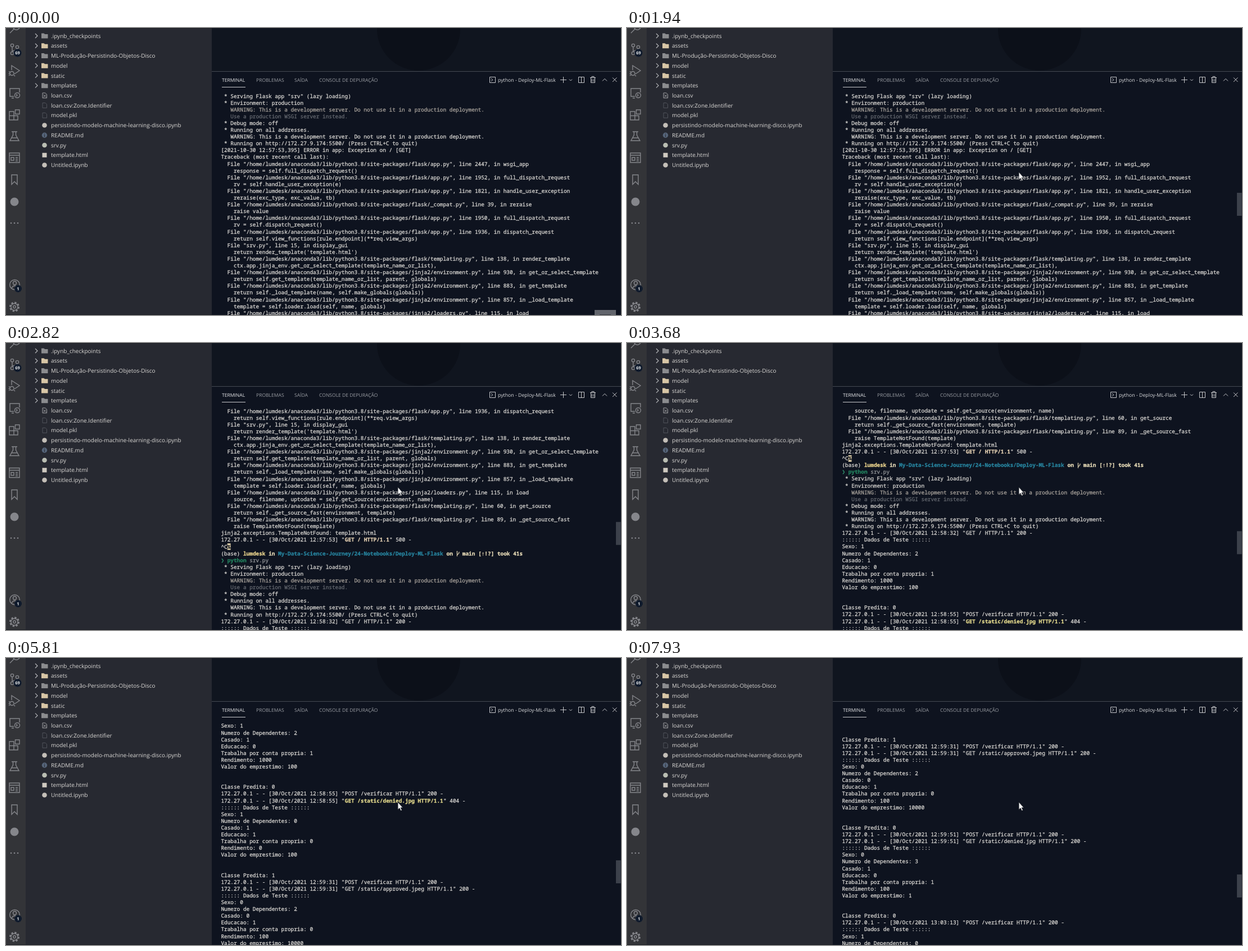
Write an HTML page that moves like this. It is 1094x512 px and loops after 8000 ms.

```html
<!DOCTYPE html>
<html lang="pt">
<head>
<meta charset="utf-8">
<title>Terminal</title>
<style>
  html, body { margin: 0; width: 100%; height: 100%; overflow: hidden; background: #0e131f; }
  svg { display: block; position: absolute; left: 0; top: 0; }
  text { white-space: pre; text-rendering: geometricPrecision; }
  .ui { font-family: "Open Sans", "Noto Sans", sans-serif; }
  .term { font: 500 9.42px "Noto Sans Mono", "DejaVu Sans Mono", monospace; font-variant-ligatures: none; color: #dad8d4; }
  .term text { fill: currentColor; stroke: currentColor; stroke-width: .28; }
  .icon { fill: none; stroke: #85868b; stroke-width: 1.4; }
  .tool { fill: none; stroke: #c6c7ca; stroke-width: 1; }
  .b { font-weight: 700; }
  .warn { color: #aaa49d; }
  .dim { color: #656970; }
  .user, .path, .pale, .cmd, .e500, .e404, .inv { font-weight: 700; }
  .user { color: #ecd58e; }
  .path { color: #27849f; }
  .pale { color: #e8dcb8; }
  .arrow { color: #2f8b6a; }
  .cmd { color: #23835f; }
  .prog { color: #96999c; }
  .e500 { color: #e6d2b4; }
  .e404 { color: #e2d88c; }
  .inv { color: #1a1c22; }
</style>
</head>
<body>
<svg id="stage" width="1094" height="512" viewBox="0 0 1094 512">
  <defs>
    <clipPath id="view"><rect x="367" y="115" width="727" height="397"/></clipPath>
    <clipPath id="top"><rect x="366" width="728" height="77"/></clipPath>
  </defs>
  <rect width="1094" height="512" fill="#0e131f"/>
  <rect x="366" width="728" height="77" fill="#10151f"/>
  <circle cx="734" cy="2" r="74" fill="#0c1019" clip-path="url(#top)"/>
  <path d="M366 77.5H1094" stroke="#454952"/>
  <rect width="35" height="512" fill="#333438"/>
  <rect x="35" width="331" height="512" fill="#272931"/>
  <rect x="35" width="331" height="1" fill="#1b1d24"/>
  <rect y="511" width="366" height="1" fill="#1b1d24"/>

  <g class="icon">
    <path d="M7 9L14 2M13 0Q15 4 20 3Q23 2 24 0"/>
    <circle cx="11" cy="31" r="2.6"/><circle cx="11" cy="45" r="2.6"/><circle cx="20" cy="34" r="2.6"/>
    <path d="M11 34V42M20 37Q19 40 11 41"/>
    <path d="M10 75V67L24 76L15 82"/><circle cx="10.5" cy="81" r="3.5"/><path d="M5 78L8 79M5 85L8 83M4.5 81.5H7M14 84L16 86"/>
    <path d="M14 122H7V108H24V115M10 125H14"/><circle cx="20" cy="120" r="4.5"/><path d="M18 118L20 120L18 122"/>
    <path d="M6 149H14V164H6ZM6 156.500H21V164H14M16.500 146H24V153.500H16.500Z"/>
    <path d="M10 185H20M12.500 185V191L7 201H23L17.500 191V185M10 196H20"/>
    <path d="M6 223H24V240H6ZM6 227H24M9 231H14V236H9ZM17 231H21M17 234H21M17 237H21"/>
    <path d="M10 262H20V279L15 274L10 279Z"/>
    <circle cx="15.5" cy="458" r="8.8"/><circle cx="15.5" cy="455" r="3"/><path d="M10 465Q11 460 15.500 460Q20 460 21 465"/>
    <circle cx="15" cy="497.5" r="7.5" stroke-width="3" stroke-dasharray="3.3 2.59"/><circle cx="15" cy="497.5" r="6"/><circle cx="15" cy="497.5" r="2.3"/>
  </g>
  <circle cx="15" cy="310" r="7.5" fill="#85868b"/>
  <g fill="#85868b"><circle cx="9" cy="348" r="1.3"/><circle cx="15" cy="348" r="1.3"/><circle cx="21" cy="348" r="1.3"/></g>
  <g fill="#0f1a2c"><circle cx="20.5" cy="44.5" r="7"/><circle cx="21.5" cy="465" r="6.5"/></g>
  <g class="ui b" fill="#e3e5e8" font-size="7.5" text-anchor="middle"><text x="20.5" y="47.3">69</text><text x="21.5" y="467.8">1</text></g>

  <g id="files" class="ui" font-size="10"></g>

  <g class="ui" font-size="8.55" fill="#9a9da3">
    <text x="384" y="95.7" fill="#e8e9eb">TERMINAL</text>
    <text x="445" y="95.7">PROBLEMAS</text>
    <text x="513" y="95.7">SAÍDA</text>
    <text x="557" y="95.7">CONSOLE DE DEPURAÇÃO</text>
    <text x="875" y="95.7" font-size="8.75" fill="#d8d9db">python - Deploy-ML-Flask</text>
  </g>
  <path d="M384 105.500H426" stroke="#c9cacd"/>
  <g class="tool">
    <path d="M860.500 87.500H870.500V97.500H860.500ZM863 90L866 92.500L863 95"/>
    <path d="M986 92.500H997M991.500 87V98M1002 91.500L1004.500 94L1007 91.500"/>
    <path d="M1018.500 87.500H1028.500V97.500H1018.500ZM1023.500 87.500V97.500"/>
    <path d="M1039 88.500H1049M1042 88V86.500H1046V88M1040.500 89V97.500H1047.500V89M1042.500 91V96M1045.500 91V96"/>
    <path d="M1061 94.500L1065 90.500L1069 94.500M1079 88.500L1086.500 96M1086.500 88.500L1079 96"/>
  </g>

  <g clip-path="url(#view)"><g id="log" class="term"></g></g>
  <path id="link" stroke="#d0cfcc" stroke-width="1"/>
  <rect id="thumb" x="1085" y="294" width="8.5" height="41" fill="#3c414b"/>
  <g id="tip"><rect x="1047" y="503" width="38" height="9" fill="#62656c"/><path d="M1056 511.500H1076" stroke="#33363d"/></g>
  <path id="mouse" d="M0 0V13.500L3 10.800L5.200 15.600L7.400 14.600L5.200 10H9Z" fill="#f4f4f4" stroke="#14171f" stroke-width=".8"/>
</svg>
<script>
const NS = "http://www.w3.org/2000/svg";
const $ = id => document.getElementById(id);
const LOOP = 8000, X0 = 382.4, BASE = 124.5, ROW = 12.1, COL = 5.651;

function add(parent, tag, attrs, text) {
  const el = document.createElementNS(NS, tag);
  for (const k in attrs) el.setAttribute(k, attrs[k]);
  if (text !== undefined) el.textContent = text;
  parent.appendChild(el);
  return el;
}

// Explorer: name, icon kind, icon colour
const GREY = "#8b8c8f", SAND = "#d8c6a6";
const files = [
  [".ipynb_checkpoints", "dir", GREY], ["assets", "dir", SAND],
  ["ML-Produção-Persistindo-Objetos-Disco", "dir", GREY], ["model", "dir", SAND],
  ["static", "dir", SAND], ["templates", "dir", GREY],
  ["loan.csv", "sheet", "#a2a3a6"], ["loan.csv:Zone.Identifier", "page", "#51545c"],
  ["model.pkl", "page", "#51545c"],
  ["persistindo-modelo-machine-learning-disco.ipynb", "dot", "#c4bfb8"],
  ["README.md", "info", "#56657a"], ["srv.py", "dot", "#b9bdb2"],
  ["template.html", "box", "#cfc9c0"], ["Untitled.ipynb", "dot", "#c4bfb8"]
];

function fileIcon(g, kind, c) {
  const line = { fill: "none", stroke: c };
  if (kind === "dir") {
    add(g, "path", { d: "M52 -4L56 0L52 4", fill: "none", stroke: "#b4b5b8", "stroke-width": 1.2 });
    add(g, "path", { d: "M63 -4.500H67.500L69 -3H74.500V4.500H63Z", fill: c });
  } else if (kind === "dot") {
    add(g, "circle", { cx: 68.5, cy: 0, r: 4.3, fill: c });
  } else if (kind === "box") {
    add(g, "rect", { x: 64.5, y: -4, width: 8, height: 8, fill: c });
  } else if (kind === "info") {
    add(g, "circle", { cx: 68.5, cy: 0, r: 4.7, fill: c });
    add(g, "path", { d: "M68.500 -2.700V-1.500M68.500 -.5V3", stroke: "#272931", "stroke-width": 1.2 });
  } else {
    add(g, "path", { d: "M65 -4.500H70L72.500 -2V4.500H65Z", ...line });
    if (kind === "sheet") add(g, "path", { d: "M66.500 -1.500L71 3M71 -1.500L66.500 3", ...line });
  }
}

files.forEach(([name, kind, c], i) => {
  const g = add($("files"), "g", { transform: `translate(0 ${14 + i * 17.73})` });
  fileIcon(g, kind, c);
  add(g, "text", { x: 80, y: 3.6, fill: "#dad8d5" }, name);
});

// Terminal log: a line is a string or a list of [text, class]
const USER = "lumdesk";
const lib = (file, line, fn, code) => [
  `  File "/home/${USER}/anaconda3/lib/python3.8/site-packages/${file}.py", line ${line}, in ${fn}`,
  "    " + code
];
const app = (line, fn, code) => lib("flask/app", line, fn, code);
const env = (line, fn, code) => lib("jinja2/environment", line, fn, code);
const tpl = (line, fn, code) => lib("flask/templating", line, fn, code);
const DEV = "WARNING: This is a development server. Do not use it in a production deployment.";
const banner = [
  ' * Serving Flask app "srv" (lazy loading)',
  " * Environment: production",
  [["   " + DEV, "warn"]],
  [["   Use a production WSGI server instead.", "dim"]],
  " * Debug mode: off",
  " * Running on all addresses.",
  "   " + DEV,
  " * Running on http://172.27.9.174:5500/ (Press CTRL+C to quit)"
];
const hit = (time, req, code, cls = "") => [
  [`172.27.0.1 - - [30/Oct/2021 ${time}] "`, ""], [req + " HTTP/1.1", cls], [`" ${code} -`, ""]
];
const LABELS = ["Sexo", "Numero de Dependentes", "Casado", "Educacao",
  "Trabalha por conta propria", "Rendimento", "Valor do emprestimo"];
const test = (...v) => [":::::: Dados de Teste ::::::", ...v.map((n, i) => `${LABELS[i]}: ${n}`)];
const result = (cls, time) => ["", "", "Classe Predita: " + cls, hit(time, "POST /verificar", 200)];

const lines = [
  ...banner,
  "[2021-10-30 12:57:53,395] ERROR in app: Exception on / [GET]",
  "Traceback (most recent call last):",
  ...app(2447, "wsgi_app", "response = self.full_dispatch_request()"),
  ...app(1952, "full_dispatch_request", "rv = self.handle_user_exception(e)"),
  ...app(1821, "handle_user_exception", "reraise(exc_type, exc_value, tb)"),
  ...lib("flask/_compat", 39, "reraise", "raise value"),
  ...app(1950, "full_dispatch_request", "rv = self.dispatch_request()"),
  ...app(1936, "dispatch_request", "return self.view_functions[rule.endpoint](**req.view_args)"),
  '  File "srv.py", line 15, in display_gui',
  "    return render_template('template.html')",
  ...tpl(138, "render_template", "ctx.app.jinja_env.get_or_select_template(template_name_or_list),"),
  ...env(930, "get_or_select_template", "return self.get_template(template_name_or_list, parent, globals)"),
  ...env(883, "get_template", "return self._load_template(name, self.make_globals(globals))"),
  ...env(857, "_load_template", "template = self.loader.load(self, name, globals)"),
  ...lib("jinja2/loaders", 115, "load", "source, filename, uptodate = self.get_source(environment, name)"),
  ...tpl(60, "get_source", "return self._get_source_fast(environment, template)"),
  ...tpl(89, "_get_source_fast", "raise TemplateNotFound(template)"),
  "jinja2.exceptions.TemplateNotFound: template.html",
  hit("12:57:53", "GET /", 500, "e500"),
  [["^C", ""], ["%", "inv"]],
  [["(base) ", ""], [USER, "user"], [" in ", "pale"],
    ["My-Data-Science-Journey/24-Notebooks/Deploy-ML-Flask", "path"],
    [" on   main [↑!?] took 41s", "pale"]],
  [["❯ ", "arrow"], ["python ", "cmd"], ["srv.py", "prog"]],
  ...banner,
  hit("12:58:32", "GET /", 200),
  ...test(1, 2, 1, 0, 1, 1000, 100), ...result(0, "12:58:55"),
  hit("12:58:55", "GET /static/denied.jpg", 404, "e404"),
  ...test(1, 0, 1, 1, 0, 0, 100), ...result(1, "12:59:31"),
  hit("12:59:31", "GET /static/approved.jpeg", 200),
  ...test(0, 2, 0, 1, 0, 100, 10000), ...result(0, "12:59:51"),
  hit("12:59:51", "GET /static/denied.jpg", 200),
  ...test(0, 3, 1, 0, 1, 100, 1), ...result(0, "13:03:13"),
  ...test(1, 0)
];

lines.forEach((line, i) => {
  const y = BASE + i * ROW;
  const runs = typeof line === "string" ? [[line, ""]] : line;
  let col = 0;
  for (const [s, cls] of runs) {
    const x = X0 + col * COL;
    if (cls === "inv") add($("log"), "rect", { x, y: y - 9, width: 5.9, height: 11.6, fill: "#e3d3ac" });
    add($("log"), "text", { x, y, class: cls }, s);
    if (s.startsWith(" on ")) // branch glyph
      add($("log"), "path", { d: `M${x + 24.5} ${y - 7.5}V${y + 2}M${x + 24.5} ${y - 1}Q${x + 28} ${y - 2} ${x + 28} ${y - 6}`,
        fill: "none", stroke: "#e8dcb8", "stroke-width": 1.2 });
    col += s.length;
  }
});

// Wheel notches, each worth 6 2/3 lines
const ticks = [2140, 2210, 2820, 3280, 3680, 4410, 5350, 5810, 7460, 7860, 7930];
// Pointer: time, x, y
const moves = [
  [70, 1062, 490], [140, 1008, 448], [210, 955, 410], [340, 900, 380], [410, 885, 372],
  [670, 848, 367], [740, 790, 338], [810, 725, 306], [880, 697, 293],
  [1410, 697, 284], [1470, 697, 270], [1540, 697, 261], [1870, 697, 259], [1940, 697, 257]
];

function draw(t) {
  const top = Math.round(ticks.filter(k => t >= k).length * 20 / 3);
  $("log").setAttribute("transform", `translate(0 ${-top * ROW})`);
  $("thumb").setAttribute("y", 294 + top * 1.263);
  $("thumb").setAttribute("opacity", Math.min(1, Math.max(0, (t - 30) / 140)));
  $("tip").setAttribute("visibility", t < 70 ? "visible" : "hidden");

  const at = moves.filter(m => t >= m[0]).pop();
  $("mouse").setAttribute("visibility", at ? "visible" : "hidden");
  if (at) $("mouse").setAttribute("transform", `translate(${at[1]} ${at[2]})`);

  // Hovered path is underlined
  const row = t >= 880 && t < 1410 ? 14 : t >= 1470 && t < 1870 ? 12 : 0;
  $("link").setAttribute("d", row ? `M${X0 + 8 * COL} ${Math.round(BASE + row * ROW) + 1.5}H857` : "");
}

const start = performance.now();
function tick() {
  draw((performance.now() - start) % LOOP);
  requestAnimationFrame(tick);
}
draw(0);
requestAnimationFrame(tick);
</script>
</body>
</html>
```
